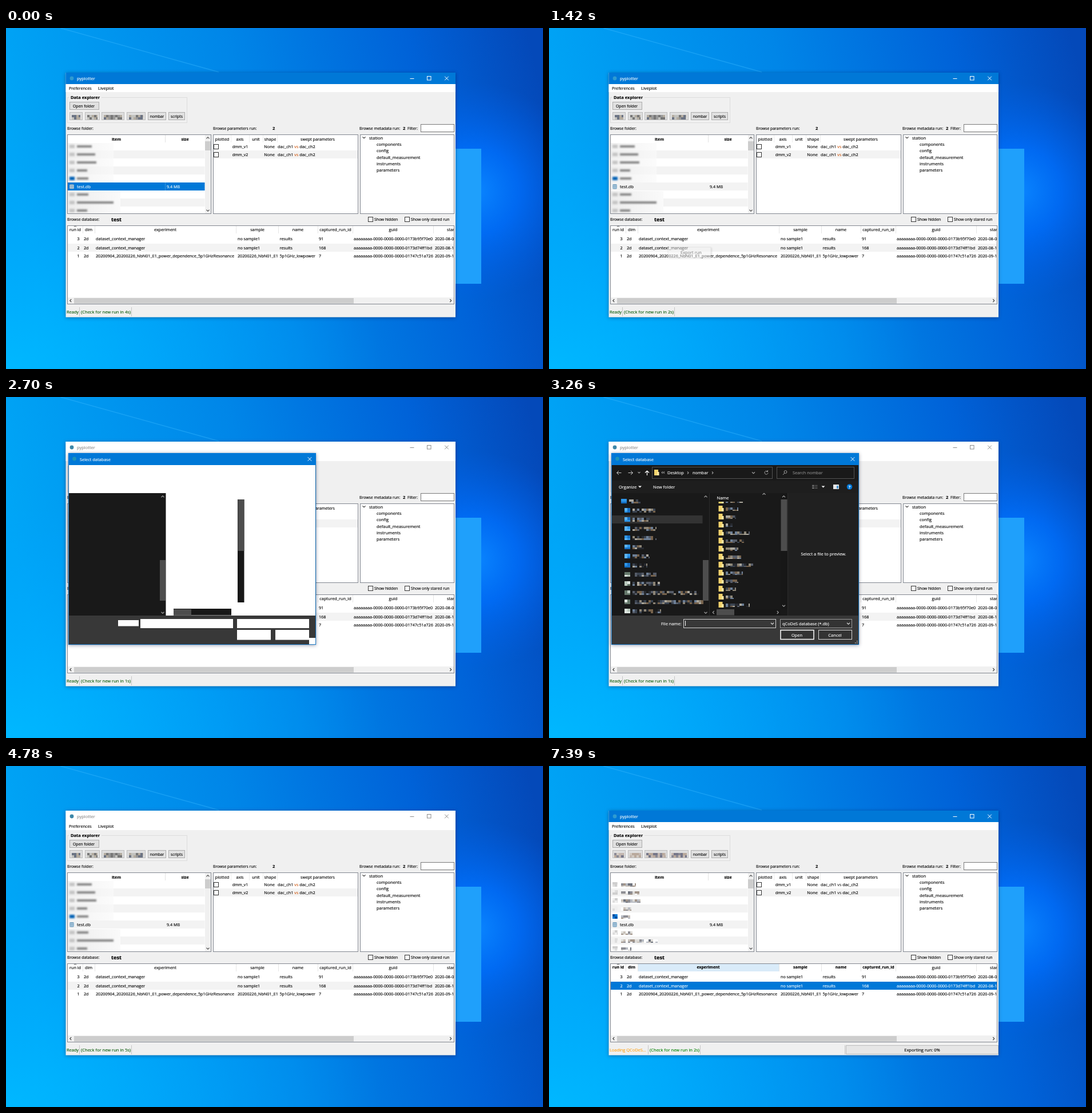
Write an HTML page that moves like this. It is 939 by 596 pixels and loops after 8000 ms.

```html
<!DOCTYPE html>
<html lang="en">
<head>
<meta charset="utf-8">
<title>pyplotter export</title>
<style>
html, body { margin: 0; width: 100%; height: 100%; overflow: hidden; background: #0082e6; }
svg { display: block; width: 100%; height: 100%; }
text { font-family: "Open Sans", "Noto Sans", sans-serif; white-space: pre; }
text, tspan { fill: currentColor; stroke: currentColor; stroke-width: .14px; }
.soft { filter: blur(1.8px); }
.shadow { filter: drop-shadow(0 1px 3px rgba(0, 10, 50, .4)); }
</style>
</head>
<body>
<svg id="stage" viewBox="0 0 939 596" xmlns="http://www.w3.org/2000/svg"></svg>
<script>
const LOOP = 8000;
const BLUE = '#0078d7';

// Drawing helpers: each returns SVG markup.
const rect = (x, y, w, h, fill, extra = '') =>
  `<rect x="${x}" y="${y}" width="${w}" height="${h}" fill="${fill}" ${extra}/>`;
const box = (x, y, w, h, fill, stroke) =>
  rect(x + .5, y + .5, w - 1, h - 1, fill, `stroke="${stroke}"`);
const path = (d, stroke, width = 1) =>
  `<path d="${d}" fill="none" stroke="${stroke}" stroke-width="${width}"/>`;
const circle = (x, y, r, fill, extra = '') =>
  `<circle cx="${x}" cy="${y}" r="${r}" fill="${fill}" ${extra}/>`;
const group = (id, content, extra = '') => `<g id="${id}" ${extra}>${content}</g>`;
// y is the vertical centre of the capitals
const text = (x, y, s, size = 7.3, color = '#000', { bold, anchor = 'start', id } = {}) =>
  `<text ${id ? `id="${id}"` : ''} x="${x}" y="${y + size * .36}" font-size="${size}" color="${color}"
    font-weight="${bold ? 700 : 400}" text-anchor="${anchor}">${s}</text>`;
const mid = { anchor: 'middle' };
const boldMid = { bold: true, anchor: 'middle' };

const chevron = (x, y, dir, color, s = 2.5) => path({
  up: `M${x - s} ${y + s / 2}l${s} ${-s}l${s} ${s}`,
  down: `M${x - s} ${y - s / 2}l${s} ${s}l${s} ${-s}`,
  left: `M${x + s / 2} ${y - s}l${-s} ${s}l${s} ${s}`,
  right: `M${x - s / 2} ${y - s}l${s} ${s}l${-s} ${s}`
}[dir], color, 1.1);
const cross = (x, y, color) =>
  path(`M${x - 3.3} ${y - 3.3}l6.6 6.6m0 -6.6l-6.6 6.6`, color);
const checkbox = (x, y) => box(x, y, 9, 9, '#fff', '#333');

const noise = n => { const v = Math.sin(n * 12.9898) * 43758.5453; return v - Math.floor(v); };
const DARK = ['#565c68', '#8d8576', '#3c4552', '#aaa69c', '#272a30', '#76624c', '#6d7f96', '#191919', '#191919'];
const PALE = ['#8f8f95', '#c9c2ba', '#6f747e', '#dedcd8', '#a2958a', '#b6bac2', '#fff'];
function mosaic(x, y, w, h, seed, colors, cell = 4) {
  let out = '';
  for (let j = 0; j < h; j += cell)
    for (let i = 0; i < w; i += cell) {
      const k = noise(seed * 31 + i * 1.7 + j * 5.3);
      out += rect(x + i, y + j, Math.min(cell, w - i), Math.min(cell, h - j),
        colors[Math.floor(k * colors.length)]);
    }
  return out;
}

function wallpaper() {
  return `<defs>
    <linearGradient id="sky" x1="0" y1=".35" x2="1" y2=".2">
      <stop offset="0" stop-color="#00a6f6"/><stop offset=".45" stop-color="#0086e8"/>
      <stop offset=".78" stop-color="#0062d8"/><stop offset="1" stop-color="#0449b9"/>
    </linearGradient>
    <radialGradient id="low" cx="0" cy="1" r=".7">
      <stop offset="0" stop-color="#00b8ff"/><stop offset="1" stop-color="#00a0ff" stop-opacity="0"/>
    </radialGradient>
    <radialGradient id="glow" gradientUnits="userSpaceOnUse" cx="820" cy="285" r="190">
      <stop offset="0" stop-color="#0a86ff"/><stop offset=".4" stop-color="#0070ff" stop-opacity=".75"/>
      <stop offset="1" stop-color="#0060e8" stop-opacity="0"/>
    </radialGradient>
    <linearGradient id="patch">
      <stop offset="0" stop-color="#ededed"/><stop offset="1" stop-color="#fafafa"/>
    </linearGradient>
    <clipPath id="tableClip"><rect x="108" y="346" width="675" height="125"/></clipPath>
    <clipPath id="fileClip"><rect x="282" y="183" width="123" height="188"/></clipPath>
  </defs>` +
  rect(0, 0, 939, 596, 'url(#sky)') + rect(0, 0, 939, 596, 'url(#low)') +
  rect(0, 0, 939, 596, 'url(#glow)') +
  path('M95 0L372 77', 'rgba(60, 185, 255, .4)', 1.4) +
  rect(595, 211, 236, 236, '#1fa0fb');
}

function titleBar(active) {
  const ink = active ? '#fff' : '#8c8c8c';
  return rect(104.5, 78, 681.5, 20.5, active ? BLUE : '#fff') +
    circle(115, 88, 3.4, active ? '#2f9bd0' : '#3d87a8') +
    text(124, 88.5, 'pyplotter', 7.5, ink) +
    path('M706.500 88.500h7', ink) + rect(736.5, 84.5, 6.5, 6.5, 'none', `stroke="${ink}"`) +
    cross(770.5, 88, ink);
}

const BUTTONS = [[111, 23], [138, 26], [167, 40], [211, 33]];
const FOLDER_ROWS = [[207, 26], [221, 32], [235, 34], [249, 18], [263, 20], [291, 20], [305, 64], [319, 18]];

function blurredNames() {
  return BUTTONS.map(([x, w], i) => mosaic(x + 4, 152, w - 8, 8, i + 3,
    ['#777', '#999', '#c2c2be', '#6c7484', '#b3ab9f'])).join('') +
    rect(108, 201, 80, 69, 'url(#patch)', 'opacity=".7"') + rect(108, 285, 92, 39, 'url(#patch)') +
    '<g class="soft">' + FOLDER_ROWS.map(([y, w]) =>
      rect(111, y - 3, 9, 6, y === 263 ? '#005fb4' : '#c4c4c4') +
      rect(124, y - 2, w, 4, '#858585')).join('') + '</g>';
}

function pixelNames() {
  return BUTTONS.map(([x, w], i) => mosaic(x + 3, 152, w - 6, 8, i + 9,
    ['#b9a99c', '#8b8a95', '#d2cac2', '#767789', '#c3b7b0'])).join('') +
    FOLDER_ROWS.map(([y, w], i) =>
      mosaic(111, y - 4, 9, 8, i, y === 263 ? ['#004d9d', '#0078d7', '#3393dd'] : ['#cfcfcf', '#dedede', '#efefef']) +
      mosaic(126, y - 2, w, 6, i + 20, PALE)).join('');
}

function explorerPane() {
  const rowBands = [221, 249, 277, 305].map(y => rect(108, y - 7, 239.5, 14, '#f3f3f3')).join('');
  const fileRow = ink => text(124, 277, 'test.db', 7.4, ink) + text(281, 277, '9.4 MB', 7.2, ink);
  return box(107, 121, 210, 45, 'none', '#dcdcdc') + rect(111, 117, 56, 8, '#f0f0f0') +
    text(113, 121, 'Data explorer', 7.5, '#000', { bold: true }) +
    box(111, 129, 52, 14, '#e1e1e1', '#adadad') + text(136, 136.5, 'Open folder', 6.8, '#000', mid) +
    BUTTONS.map(([x, w]) => box(x, 147, w, 14, '#dedede', '#bdbdbd')).join('') +
    box(248, 147, 32, 14, '#e1e1e1', '#adadad') + text(264, 154.5, 'nombar', 6.6, '#000', mid) +
    box(284, 147, 29, 14, '#e1e1e1', '#adadad') + text(298.5, 154.5, 'scripts', 6.8, '#000', mid) +
    text(107, 175.5, 'Browse folder:', 6.8) +
    box(107, 186, 252, 139, '#fff', '#828790') + rowBands +
    text(193, 194, 'item', 7, '#000', boldMid) + text(313, 194, 'size', 7, '#000', boldMid) +
    path('M278.500 187v13', '#e3e3e3') +
    rect(348, 187, 10, 137, '#f0f0f0') + rect(348, 198, 10, 16, '#cdcdcd') +
    chevron(353, 192, 'up', '#505050') + chevron(353, 319, 'down', '#505050') +
    group('blurred', blurredNames()) + group('pixelated', pixelNames()) +
    fileRow('#000') +
    group('fileSelected', rect(108, 270, 239.5, 14, BLUE) + path('M278.500 270v14', '#3a95df') + fileRow('#fff')) +
    rect(111, 273, 8, 8.5, '#7ea7c4', 'rx="2"') + path('M111 276h8M111 279h8', '#dcebf5', .8);
}

function parameterPane() {
  const heads = [[378, 'plotted', 7.4], [409, 'axis'], [437, 'unit'], [462, 'shape', 7.4], [545, 'swept parameters', 7.1]];
  const row = (y, axis) => checkbox(363, y - 4) + text(409.5, y + .5, axis, 6.9, '#000', mid) +
    text(460.5, y + .5, 'None', 7.3, '#000', mid) +
    text(475, y + .5, 'dac_ch1 <tspan class="versus">vs</tspan> dac_ch2', 7.3);
  return text(362, 175.5, 'Browse parameters run:', 6.8) + text(466, 175.5, '2', 7.5, '#000', { bold: true }) +
    box(362, 186, 254, 139, '#fff', '#828790') + rect(363, 214, 252, 14, '#f3f3f3') +
    heads.map(([x, s, size]) => text(x, 194, s, size, '#000', mid)).join('') +
    path('M393.500 187v13M425.500 187v13M449.500 187v13M474.500 187v13', '#ebebeb') +
    row(207, 'dmm_v1') + row(221, 'dmm_v2');
}

function metadataPane() {
  return text(618, 175.5, 'Browse metadata run:', 6.9) + text(694, 175.5, '2', 7.5, '#000', { bold: true }) +
    text(702, 175.5, 'Filter:', 6.9) + box(725, 168, 59, 14, '#fff', '#7a7a7a') +
    box(619, 186, 165, 139, '#fff', '#828790') + chevron(626, 191.5, 'down', '#444') +
    text(635, 192, 'station', 7.5) +
    ['components', 'config', 'default_measurement', 'instruments', 'parameters']
      .map((s, i) => text(648, 203.5 + i * 11.3, s, 7.45)).join('');
}

function runHeader(selected) {
  const o = { bold: selected, anchor: 'middle' };
  const size = selected ? 6.9 : 7.3;
  return [[121, 'run id'], [144.5, 'dim'], [278.5, 'experiment'], [439.5, 'sample'], [510.5, 'name'], [576, 'captured_run_id']]
    .map(([x, s]) => text(x, 352, s, size, '#000', o)).join('') +
    text(677, 352, 'guid', 7.3, '#000', mid) + text(771, 352, 'start time', 7.2);
}

const COLUMNS = [136, 157, 405, 478.5, 547, 608, 750];
const runRow = (y, id, cells, ink = '#000') =>
  text(128.5, y, id, 7.2, ink, { anchor: 'end' }) +
  cells.map((s, i) => text(COLUMNS[i], y, s, 7.18, ink)).join('');
const RUN2 = ['2d', 'dataset_context_manager', 'no sample1', 'results', '168',
  'aaaaaaaa-0000-0000-0000-0173d74ff1bd', '2020-08-12'];

function runTable() {
  const columnLines = [134, 155, 402, 476, 545, 606, 747].map(x => `M${x}.500 346v13`).join('');
  return text(107, 335, 'Browse database:', 6.85) + text(184, 335, 'test', 9.2, '#000', { bold: true }) +
    checkbox(633, 330) + text(644, 335, 'Show hidden', 6.8) +
    checkbox(697, 330) + text(708, 335, 'Show only stared run', 6.85) +
    box(107, 345, 677, 138, '#fff', '#828790') +
    '<g clip-path="url(#tableClip)">' +
    group('headHot', rect(155, 346, 247.5, 13, '#d9ebf9')) + path(columnLines, '#e5e5e5') +
    chevron(121, 346.5, 'up', '#888', 2) +
    group('headPlain', runHeader(false)) + group('headBold', runHeader(true)) +
    rect(108, 377, 675, 14, '#f3f3f3') +
    runRow(368.5, '3', ['2d', 'dataset_context_manager', 'no sample1', 'results', '91',
      'aaaaaaaa-0000-0000-0000-0173b95f70e0', '2020-08-06']) +
    runRow(384.5, '2', RUN2) +
    group('runSelected', rect(108, 377, 675, 14, BLUE) + runRow(384.5, '2', RUN2, '#fff')) +
    runRow(398.5, '1', ['2d', '20200904_20200226_NbN01_E1_power_dependence_5p1GHzResonance',
      '20200226_NbN01_E1', '5p1GHz_lowpower', '7', 'aaaaaaaa-0000-0000-0000-01747c51a726', '2020-09-15']) +
    '</g>' +
    rect(108, 471, 675, 11, '#f0f0f0') + rect(119, 472, 489, 9.5, '#cdcdcd') +
    chevron(113, 476.5, 'left', '#444') + chevron(777.5, 476.5, 'right', '#444');
}

function statusBar() {
  return text(106, 496, '', 7.4, '#000', { id: 'stateText' }) + text(131, 496, '', 7.55, '#000', { id: 'checkText' }) +
    `<path id="separators" stroke="#c6c6c6" fill="none"/>` +
    group('progress', path('M517.500 488v16', '#c6c6c6') + box(519, 488, 267, 16, '#e6e6e6', '#bcbcbc') +
      text(652.5, 496, 'Exporting run: 0%', 7.55, '#000', mid));
}

function mainWindow() {
  return rect(104.5, 78, 681.5, 427.5, '#f0f0f0', 'class="shadow"') +
    group('titleOn', titleBar(true)) + group('titleOff', titleBar(false)) +
    rect(104.5, 98, 681.5, 14, '#fff') + text(110, 105.5, 'Preferences', 7.2) + text(161, 105.5, 'Liveplot', 7.5) +
    explorerPane() + parameterPane() + metadataPane() + runTable() + statusBar();
}

const contextMenu = () => rect(209, 384, 76, 19, '#000', 'class="soft" opacity=".2"') +
  rect(208, 383, 75, 19, '#f2f2f2', 'stroke="#ccc" stroke-width=".7"') +
  text(230, 392.5, 'Export run', 7.45, '#222');

const NAV_WIDTHS = [24, 40, 30, 42, 42, 20, 30, 26, 42, 48, 115, 124, 50];
const FILE_WIDTHS = [32, 22, 27, 48, 30, 22, 18, 14, 42];

function navigation() {
  return rect(110, 207, 158.5, 14, '#333') + NAV_WIDTHS.map((w, i) => {
    const y = 182 + i * 16;
    const icon = i < 8 ? ['#2f96e8', '#1670c4', '#5cb4f4'] : ['#b9c8bd', '#66796c', '#dce4de'];
    return mosaic(i ? 132 : 126, y - 4, 10, 8, i, icon, 5) +
      mosaic(i ? 146 : 140, y - 3, w, 7, i + 40, DARK);
  }).join('');
}

function fileRows() {
  const names = ['a.db', 'lol.db', 'test.db'];
  let out = '';
  for (let i = 0; i < 27; i++) {
    const y = 363 - (26 - i) * 14;
    out += i < 23
      ? rect(296.5, y - 5, 7, 10, '#f3d26c') + rect(302, y - 1, 3.5, 6, '#ffe9a3') +
        mosaic(309, y - 2, FILE_WIDTHS[(i + 4) % 9], 6, i + 70, DARK)
      : rect(296.5, y - 4.5, 7, 9, '#e8ece9') +
        (i < 24 ? mosaic(309, y - 3, 95, 6, 99, DARK) :
          circle(300, y + .5, 2, '#8aa394') + text(307, y, names[i - 24], 7.45, '#fff'));
  }
  return out;
}

function dialogControls() {
  const ink = '#fff', dim = '#a0a0a0';
  return rect(110, 119, 431, 263, '#191919') + rect(110, 146, 431, 22, '#1e1e1e') + rect(418, 168, 123, 214, '#202020') +
    path('M118.500 132.500h8m-8 0l3.500 -3.500m-3.500 3.500l3.500 3.500', '#c8c8c8') +
    path('M146.500 132.500h-8m8 0l-3.500 -3.500m3.500 3.500l-3.500 3.500', '#c8c8c8') + chevron(157.5, 132, 'down', dim, 2) +
    path('M171.500 137v-8m0 0l-3.500 3.500m3.500 -3.500l3.500 3.500', ink, 1.2) +
    box(180, 122, 211, 21, '#191919', '#535353') + rect(184, 127, 7, 10, '#f3d26c') + rect(189, 131, 3.5, 6, '#ffe9a3') +
    chevron(198, 132, 'left', dim, 1.7) + chevron(201, 132, 'left', dim, 1.7) +
    text(207, 132.5, 'Desktop', 7.5, ink) + chevron(243, 132.5, 'right', dim, 2) +
    text(251, 132.5, 'nombar', 7.4, ink) + chevron(286, 132.5, 'right', dim, 2) + chevron(357.5, 132.5, 'down', dim) +
    path('M382 130a3 3 0 1 0 1 2.500M382.500 128v2.500h-2.500', dim) +
    box(398, 122, 136, 21, '#191919', '#535353') +
    circle(413.5, 131, 2.4, 'none', `stroke="${dim}"`) + path('M411.800 133l-2.800 3', dim) +
    text(426, 132.5, 'Search nombar', 7.4, '#8a8a8a') +
    text(122, 157, 'Organize', 7.5, ink) + `<path d="M156 155.500h6l-3 3z" fill="${ink}"/>` + text(182, 157, 'New folder', 7.5, ink) +
    path('M460 154.500h4m-4 2.500h4m-4 2.500h4', dim, 1.2) + path('M465 154.500h4.500m-4.500 2.500h4.500m-4.500 2.500h4.500', '#666') +
    `<path d="M476.500 155.500h6l-3 3z" fill="${ink}"/>` +
    rect(497, 153, 10, 8, '#e6e6e6') + rect(503, 155, 3, 5, '#4593cf') +
    circle(525.5, 157, 4.8, BLUE) + text(525.5, 157, '?', 7.5, ink, boldMid) +
    text(304, 176, 'Name', 7.5, ink, mid) + chevron(376, 169.5, 'up', dim) + path('M280.500 168v214M417.500 168v214', '#2b2b2b') +
    text(480, 274.5, 'Select a file to preview.', 7.5, ink, mid) +
    text(196, 396, 'File name:', 7.5, ink) +
    box(235, 388, 162, 16, '#383838', '#d0d0d0') + path('M238.500 391v9', ink) + chevron(390.5, 396, 'down', '#ddd') +
    box(404, 388, 126, 16, '#333', '#9b9b9b') + text(408, 396, 'qCoDeS database (*.db)', 7.35, ink) + chevron(523.5, 396, 'down', '#ddd') +
    rect(405, 407.5, 58, 16, '#333', 'stroke="#fff" stroke-width="1.500"') + text(433.5, 416, 'Open', 7.4, ink, mid) +
    box(471, 407, 59, 17, '#333', '#d8d8d8') + text(500, 416, 'Cancel', 7.6, ink, mid) +
    [[538, 426], [538, 429], [535, 429]].map(([x, y]) => rect(x, y, 1.5, 1.5, '#bbb')).join('') +
    rect(405, 168, 11.5, 203, '#171717') + chevron(410.5, 174, 'up', dim) + chevron(410.5, 365, 'down', dim) +
    rect(282, 371, 123, 10.5, '#171717') + chevron(287.5, 376.5, 'left', dim) + chevron(400, 376.5, 'right', dim) +
    group('lists', navigation() + '<g clip-path="url(#fileClip)">' +
      `<rect id="hover" x="292" y="0" width="113" height="14" fill="#4d4d4d"/>` +
      group('files', fileRows()) + '</g>');
}

// Dialog before its controls are painted
const blankControls = () => rect(110, 119, 431, 263, '#fff') + rect(110, 168, 169.5, 214, '#191919') +
  rect(405, 179, 11.5, 180, '#171717') + rect(293, 370, 101, 11.5, '#171717') +
  rect(196, 390, 36, 10.5, '#fff') + rect(235, 388, 162, 16, '#fff') + rect(404, 388, 126, 16, '#fff') +
  rect(404, 407, 59, 17.5, '#fff') + rect(471, 407, 59, 17.5, '#fff') + rect(530, 421, 11.5, 11.5, '#fff');

function dialog() {
  return rect(109, 98, 433, 335, '#383838', 'class="shadow"') +
    rect(109, 98, 433, 21, BLUE) + circle(119.5, 108, 3.4, '#1f93b8') +
    text(129, 109, 'Select database', 7.4, '#fff') + cross(531, 108.5, '#fff') +
    group('blank', blankControls()) + group('controls', dialogControls()) +
    rect(269, 285, 10, 71, '#4d4d4d') +
    chevron(274, 174, 'up', '#a0a0a0') + chevron(274, 377, 'down', '#a0a0a0') +
    `<rect id="thumb" x="405.500" y="179" width="11" height="90" fill="#4d4d4d"/>` +
    rect(293, 371, 31, 10.5, '#4d4d4d') +
    rect(109.3, 98.3, 432.4, 334.4, 'none', `stroke="${BLUE}" stroke-width=".8"`);
}

document.getElementById('stage').innerHTML = wallpaper() + mainWindow() +
  group('menu', contextMenu()) + group('dialog', dialog());

const $ = id => document.getElementById(id);
const show = (id, on) => $(id).setAttribute('display', on ? 'inline' : 'none');
const ramp = (t, a, b) => Math.min(1, Math.max(0, (t - a) / (b - a)));
const ease = p => p * p * (3 - 2 * p);
const between = (t, a, b) => t >= a && t < b;

const countdown = s => `(Check for new run in ${s}s)`;
// start, state, check text
const STATUS = [
  [0, 'Ready', countdown(4)], [400, 'Ready', countdown(3)], [1320, 'Ready', countdown(2)],
  [2260, 'Ready', countdown(1)], [3900, 'Ready', '(No run detected)'], [4340, 'Ready', countdown(5)],
  [5020, 'Exporting run', countdown(5)], [5390, 'Exporting run', countdown(4)],
  [5840, 'Loading QCoDeS...', countdown(4)], [6410, 'Loading QCoDeS...', countdown(3)],
  [7390, 'Loading QCoDeS...', countdown(2)]
];
const CHECK_X = { 'Ready': 131, 'Exporting run': 158, 'Loading QCoDeS...': 176 };

function updateStatus(t) {
  const [, state, check] = STATUS.filter(s => s[0] <= t).pop();
  const x = CHECK_X[state], ready = state === 'Ready', idle = check.startsWith('(No');
  $('stateText').textContent = state;
  $('stateText').setAttribute('color', ready ? '#0a5a0a' : '#ffa31a');
  $('checkText').textContent = check;
  $('checkText').setAttribute('x', x);
  $('checkText').setAttribute('color', idle ? '#000' : ready ? '#0a5a0a' : '#008000');
  $('separators').setAttribute('d', `M${x - 2.5} 488v16` + (idle ? '' : `M${x + 88.5} 488v16`));
}

function update(t) {
  const exporting = t >= 5020;
  const inactive = between(t, 2460, 5020);
  show('titleOn', !inactive);
  show('titleOff', inactive);
  show('fileSelected', t < 1340);
  show('blurred', !exporting);
  show('pixelated', exporting);
  show('headPlain', !exporting);
  show('headBold', exporting);
  show('runSelected', exporting);
  show('progress', exporting);
  $('headHot').setAttribute('opacity', exporting ? 1 : ramp(t, 960, 1040) - ramp(t, 1140, 1260));
  document.querySelectorAll('.versus').forEach(v => v.setAttribute('color', exporting ? '#333' : '#d2601a'));

  $('menu').setAttribute('opacity', ramp(t, 1340, 1500) - ramp(t, 2080, 2200));

  const painted = t >= 2780;
  const scroll = ease(ramp(t, 3340, 3780));
  $('dialog').setAttribute('opacity', ramp(t, 2520, 2680) - ramp(t, 4640, 4780));
  show('blank', !painted);
  show('controls', painted);
  show('lists', t >= 3060);
  $('files').setAttribute('transform', `translate(0 ${(1 - scroll) * 182})`);
  $('thumb').setAttribute('y', 179 + scroll * 88);
  $('thumb').setAttribute('height', 90 + scroll * 2);
  show('hover', t >= 3780);
  $('hover').setAttribute('y', t < 4260 ? 314 : 328);

  updateStatus(t);
}

const start = performance.now();
function frame(now) {
  update(Math.max(0, now - start) % LOOP);
  requestAnimationFrame(frame);
}
update(0);
requestAnimationFrame(frame);
</script>
</body>
</html>
```
